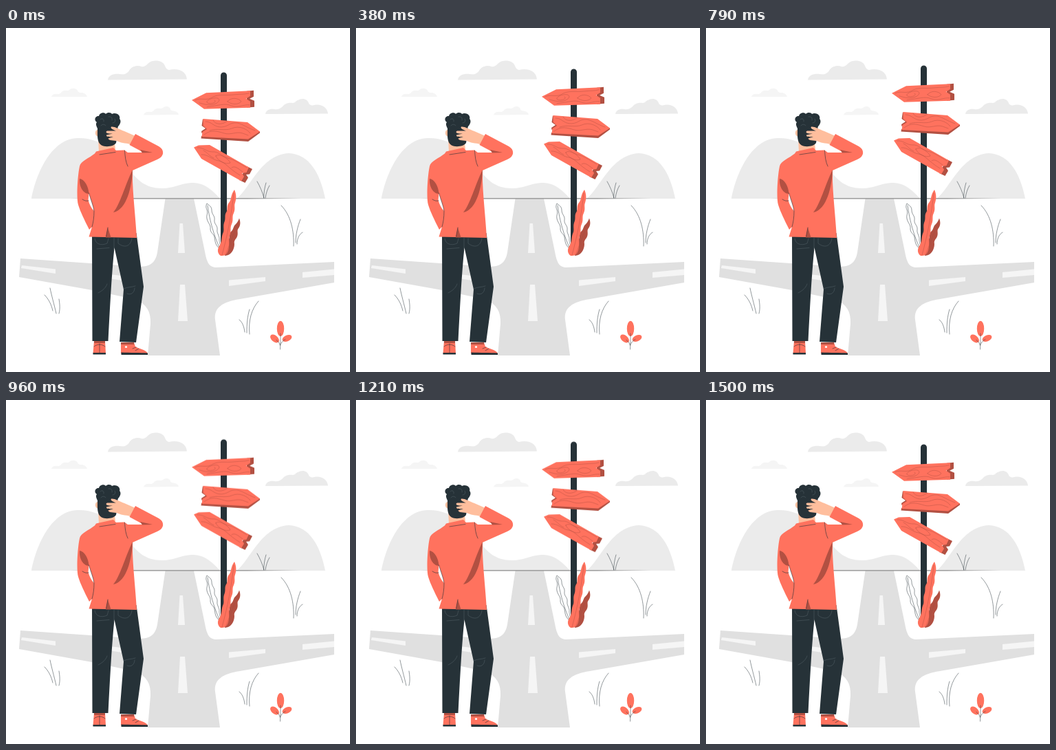
Animation, 500 px wide and 500 px high, one loop 1540 ms. Source, as an HTML page:

```html
<!DOCTYPE html>
<html lang="en">
<head>
<meta charset="utf-8">
<title>Crossroads</title>
<style>
  html, body { margin: 0; width: 100%; height: 100%; overflow: hidden; background: #fff; }
  svg { display: block; width: 100vw; height: 100vh; }
  .coral { fill: #ff725e; }
  .shade { fill: #b25042; }
  .dark { fill: #263238; }
  .skin { fill: #ffbe9d; }
  .hill { fill: #ebebeb; }
  .road { fill: #e0e0e0; }
  .pale { fill: #f5f5f5; }
  .ink, .grass { fill: none; stroke: #263238; stroke-width: .6; stroke-linecap: round; stroke-linejoin: round; }
  .grass { stroke-width: .5; }
  .grain { fill: none; stroke: #a84c40; stroke-width: .4; stroke-linecap: round; }
  .seam { fill: none; stroke: #56646a; stroke-width: .5; stroke-linecap: round; }
</style>
</head>
<body>
<svg viewBox="0 0 500 500">
  <!-- clouds -->
  <path class="hill" d="M148 75.500C149 68 157 66 166 67C173 68 176 66 179 62C183 55 191 54 197 56C201 57 204 54 206 52C212 46 225 46 230 53C232 56 232 60 237 61C249 58 262 62 263 74.500Z"/>
  <path class="hill" d="M377 125C378 119 384 117 390 118C397 119 400 116 403 113C406 109 413 108 417 109C420 109 421 106 424 105C431 101 438 103 440 109C441 112 444 113 448 112C458 110 467 115 468 124.500Z"/>
  <path class="pale" d="M66 100C67 96 71 95 76 96C80 96 80 92 84 91C87 90 90 92 92 90C95 87 102 87 104 91C105 94 108 94 111 94C115 95 117 97 118 100Z"/>
  <path class="pale" d="M200 126.500C201 122 206 121 211 122C214 122 215 118 219 117C222 116 225 118 228 116C231 113 238 113 239 118C240 121 243 120 246 121C249 122 251 124 251 126Z"/>

  <!-- hills -->
  <path class="hill" d="M37 248C44 211 66 161 104 160C140 159 164 184 179 205C191 222 204 233 226 233C246 233 254 225 273 225C290 226 300 236 311 248Z"/>
  <path class="hill" d="M335 248C354 235 370 184 411 182C441 183 457 212 464 248Z"/>

  <!-- crossroads -->
  <path class="road" d="M231.500 248H273L289 325C292 342 296 348 306 348L477 340V370L340 394C314 398 302 407 304 424L311 476H206L210 430C211 412 204 402 190 395L125 381L19 362L21 335L188 346.500C208 348 217 343 220 326Z"/>
  <path class="pale" d="M252.500 284H257L260 327H250ZM253 373H260L264 426H250ZM23 345L72 350.500V357L22 349ZM324 366.500L377 362V368L324 375ZM431 355L477 350.500V359L431 363ZM150 358L168 360V367L150 364Z"/>
  <path fill="#8b8b8b" d="M93 247.700L180 247.200H350L430 247.700L350 248.400H180Z"/>

  <!-- grass -->
  <path class="grass" d="M375 247C373 239 369 230 365 223M374.500 247C375 238 376 231 378 225M377 247C378 240 380 234 383 229
    M418 317C419 295 414 272 400 258M421 312C421 300 424 288 428 278M423 314C423 306 426 300 431 297
    M73 415C70 402 66 388 64 378M68 411C66 402 62 394 56 388M77 415C79 408 78 400 77 394
    M354 445C352 425 357 408 367 397M350 443C350 430 351 418 354 409M347 442C346 433 343 427 339 424"/>

  <!-- sprout -->
  <g class="coral">
    <ellipse cx="399" cy="437" rx="5.200" ry="11.300"/>
    <ellipse cx="390.500" cy="451.500" rx="7.500" ry="4.600" transform="rotate(40 390.500 451.500)"/>
    <ellipse cx="408.500" cy="451" rx="7.300" ry="4.300" transform="rotate(-24 408.500 451)"/>
  </g>
  <path class="grass" d="M398.500 467C399 459 399 452 399 444M398.500 461C397 457 395 455 393 453.500M398.500 461C400 457 403 454 406 452.500"/>

  <!-- signpost -->
  <g id="post">
    <path class="dark" d="M312 329V69A4.500 4.500 0 0 1 321 69V329Z"/>

    <g transform="translate(0 .8)">
      <path class="shade" d="M350 91L360 90V99L354 102L361 105V114L350 115Z"/>
      <path class="coral" d="M270 104L291 93.500L355 90.500V98L349 102L355 106V115L288 117Z"/>
      <path class="grain" d="M275 104C283 100 289 105 298 101C309 94 317 98 333 96C341 95 346 96 353 94M281 108C288 110 297 113 305 109C313 105 310 100 303 101C294 102 287 108 296 109C303 109 306 106 303 104M292 114C309 112 318 108 327 112C338 116 344 110 354 111M322 106C326 100 337 100 342 106C338 111 328 111 322 106Z"/>
    </g>

    <g transform="translate(0 1)">
      <path class="shade" d="M284 156L352 159L369 149V151.500L352 164L283.500 159.500ZM286 131L284.500 141L290 145L284 149L284.500 152L295 147Z"/>
      <path class="coral" d="M286.500 131L351 136L369 149.500L352 160.500L284.500 157L285.500 150L292 146L286.500 141Z"/>
      <path class="grain" d="M290 135C300 135 301 143 313 143C325 142 324 136 336 137C345 139 350 144 362 148M301 133C304 140 315 140 322 134M288 154C298 146 307 149 317 152C327 155 334 149 344 152L352 155M296 148C307 144 319 149 328 145C339 140 351 146 355 152"/>
    </g>

    <g transform="translate(0 2)">
      <path class="shade" d="M350 199L358 203L354 210.500L349 211L352 215.500L347.500 223L339 219Z"/>
      <path class="coral" d="M273 171.500L280 168.500L296 168L353 200.500L349.500 208L343 209L346 214L342 220.500L284 188Z"/>
      <path class="grain" d="M278 172C287 171 291 178 300 178C308 177 313 184 322 187C332 189 342 197 350 201M284 182C293 181 300 190 309 191C318 192 323 202 340 212M305 184C308 179 323 187 326 194C320 197 308 192 305 184ZM287 176C293 179 295 184 302 187M328 201C333 197 339 204 344 207"/>
    </g>
  </g>

  <!-- bush -->
  <path class="grass" d="M311 321C304 316 304 310 303 304C302 299 297 298 297 292C298 286 293 283 292 277C291 271 294 270 292 264C290 260 291 257 292 255C295 258 299 259 299 265C299 271 304 273 303 279C302 285 308 287 307 293C306 299 311 302 310 308C310 313 313 317 311 321ZM293 258C296 280 302 301 311 321"/>
  <path class="shade" d="M318 331C319 322 320 314 323 309C326 305 323 300 327 296C331 293 330 288 334 285C337 282 338 279 339 276.500C341 282 341 287 338 291C335 294 338 298 336 303C334 308 331 308 332 314C332 322 327 331 318 331Z"/>
  <path class="coral" d="M312 331C307 328 307 321 310 317C314 311 313 304 315 299C318 294 315 289 317 283C320 277 317 273 320 268C323 264 320 259 324 254C328 250 326 243 332 235C335 242 335 248 333 254C331 259 334 262 331 269C328 274 331 279 328 285C325 291 328 296 325 302C323 307 325 312 324 318C323 325 321 332 312 331Z"/>
  <path class="grain" d="M331 240C328 270 322 301 314 330M337 284C331 297 325 315 319 330"/>

  <!-- legs -->
  <path class="dark" d="M125 298L125.500 455H148.500C151 408 153 365 157.500 319L171 380L165 456L189 457L200 376L189.500 298Z"/>
  <path class="seam" d="M129 306C130 314 138 317 147 313L149 306M163 306V313C172 320 181 318 183 306M132 321L150 319.500M134 385C140 382 145 378 147 372M171 379C177 376 183 377 188 375M176 386C182 389 187 384 187 378M157 305V320"/>

  <!-- shoes -->
  <path class="coral" d="M128 455H144L145 473H126.500ZM167 457H186L188 463C194 467 203 467 206 473H167Z"/>
  <path class="shade" d="M128 455H144V458H128ZM167 457H186V460H167Z"/>
  <path class="dark" d="M126.500 472H145V474.500H126.500ZM167.500 471.500C180 472 195 472 206 472.500V475H167.500Z"/>
  <path class="ink" d="M136 459V472M128 463C133 459 139 459 144 463M184 466L189 464M188 469L193 466"/>
  <circle cx="174.500" cy="463.500" r="1.600" fill="#fff"/>

  <!-- head -->
  <path class="skin" d="M134 160L135 180L159 176L157 160ZM134 148C130 147 129 153 131 156C132 158 134 157 135 156Z"/>
  <path class="dark" d="M133 146C131 142 130 139 132 137C127 134 130 127 135 128C136 123 143 122 145 125C148 122 153 123 154 125C160 122 167 127 165 132C168 135 166 140 163 143C161 148 162 158 160 167C156 173 142 174 137 169C132 164 133 154 133 146Z"/>
  <path class="seam" d="M137 133C140 130 143 133 142 136M149 129C153 128 155 131 154 134M158 132C160 135 158 138 155 138M138 142C140 139 144 140 145 142"/>
  <path class="skin" d="M188 157L172 150C164 147 158 143 153 143.500C151 146 156 148 160 149.500L147 149.500C143 152 148 154 155 153.500L146 155.500C145 159 152 158 156 158L148.500 160.500C149 164 157 163 162 164.500C169 168 176 167 183 170Z"/>

  <!-- jacket -->
  <path class="coral" d="M131 179.500L156 174L160 178L172 177.500L177 181L200 181L179.500 170L188 154L222 172C231 177 230 187 220 191L184 207C183 232 188 270 190 305L120.500 303.500L125 289L121 293C114 279 108 267 105 257C102 247 104 215 107 201C108 194 121 189 129 182.500Z"/>
  <path fill="#fff" d="M120.500 240C123 249 127 258 128 266C124 262 121 256 119.500 250Z"/>
  <path class="shade" d="M107 219C114 220 120 230 120.500 241C112 241 106 230 107 219ZM184 206C183 230 176 264 156 268C166 256 172 231 184 206ZM195 177L213 181L198 181.500ZM148 290L152.500 304.500H145Z"/>
  <path class="ink" d="M120.500 240C123 249 127 258 128 266C128 275 127 282 125 289M111 249C114 251 117 252 120 251M172.500 178C173 187 174 195 177 201M136 184L159 180.500M148 290L145.500 303"/>
</svg>
<script>
  // The signpost rises and sinks at a constant speed, 24 pictures a second.
  const LOOP = 1540, HALF = 750, LIFT = 10;
  const at = (ms, y) => ({
    offset: ms / LOOP,
    transform: `translateY(${y}px)`,
    easing: 'steps(18, end)'
  });
  document.getElementById('post').animate(
    [at(0, 0), at(HALF, -LIFT), at(2 * HALF, 0), at(LOOP, 0)],
    { duration: LOOP, iterations: Infinity }
  );
</script>
</body>
</html>
```
